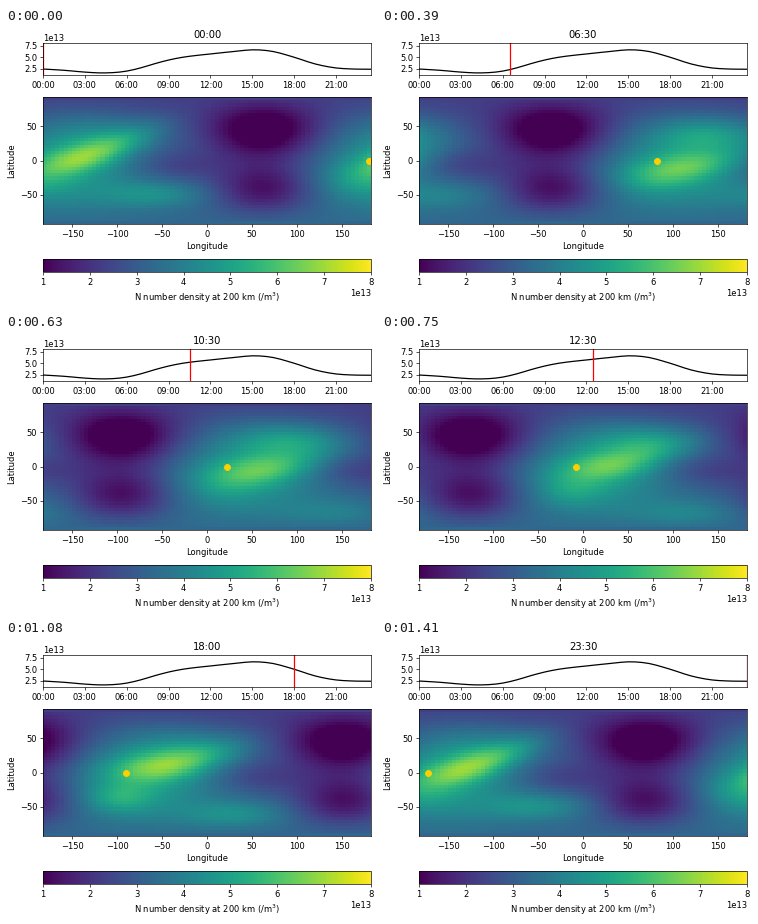
A matplotlib script for the animation above (1440 ms loop, 370x278 px).

```python
import matplotlib.pyplot as plt
import numpy as np
from matplotlib.animation import FuncAnimation

W, H, DPI = 370, 278, 60
FRAMES, INTERVAL = 48, 30
SCALE = 1e13

plt.rcParams["font.family"] = "DejaVu Sans"


def hermite(x, xs, ys):
    """Smooth curve through the points (xs, ys)."""
    xs, ys = np.asarray(xs, float), np.asarray(ys, float)
    slope = np.gradient(ys, xs)
    i = np.clip(np.searchsorted(xs, x, side="right") - 1, 0, len(xs) - 2)
    h = xs[i + 1] - xs[i]
    u = (x - xs[i]) / h
    return ((1 + 2 * u) * (1 - u) ** 2 * ys[i] + u * (1 - u) ** 2 * h * slope[i]
            + u * u * (3 - 2 * u) * ys[i + 1] + u * u * (u - 1) * h * slope[i + 1])


def daily(hour, values):
    """Value of a parameter that repeats every 24 hours."""
    v = list(values)
    return hermite(hour, [-6, *KEY_HOURS, 24, 28], [v[-1], *v, v[0], v[1]])


KEY_HOURS = [0, 4, 6.5, 10.5, 14.5, 18]
PARAMS = {
    "ridge_amp": [2.3, 1.7, 1.7, 1.7, 1.9, 2.3],
    "ridge_lon": [48, 28, 28, 38, 46, 49],
    "ridge_lat": [8, -10, -11, -5, 11, 12],
    "ridge_slope": [0.40, 0.25, 0.20, 0.20, 0.25, 0.20],
    "north_amp": [0, 0.5, 0.8, 0.9, 0.7, 0.2],
    "north_lon": [82, 25, 55, 75, 95, 100],
    "noon_amp": [0.6, 0.5, 0.4, 0.4, 1.3, 1.3],
    "dusk_amp": [1.3, 0.9, 0.8, 0.9, 1.3, 1.4],
    "dusk_lat": [-50, -48, -52, -68, -68, -62],
}

lon = np.linspace(-180, 180, 80)
lat = np.linspace(-90, 90, 40)
LON, LAT = np.meshgrid(lon, lat)
BASE = 2.8 - 0.5 * np.sin(np.radians(LAT))
TAPER = np.clip(np.cos(np.radians(LAT)), 0, 1) ** 0.25


def sun_lon(hour):
    return 180 - 15 * hour


def density(hour):
    p = {name: daily(hour, values) for name, values in PARAMS.items()}

    def bump(amp, lon0, lat0, sx, sy, slope=0, bend=0):
        dx = (LON - sun_lon(hour) - lon0 + 180) % 360 - 180
        dy = LAT - lat0 - slope * dx - bend * dx ** 2
        return amp * np.exp(-0.5 * ((dx / sx) ** 2 + (dy / sy) ** 2))

    field = (
        bump(1.9, 24, 0, 57, 50)
        + bump(0.85, 78, 43, 55, 22)
        + bump(p["ridge_amp"], p["ridge_lon"], p["ridge_lat"], 46, 16,
               p["ridge_slope"], 0.001)
        + bump(p["north_amp"], p["north_lon"], 38, 36, 15)
        + bump(p["noon_amp"], -8, -38, 26, 16)
        + bump(p["dusk_amp"], 121, p["dusk_lat"], 40, 14)
        + bump(-0.6, 147, -8, 35, 15)
        + bump(-2.4, -117, 46, 41, 29)
        + bump(-2.05, -117, -44, 38, 27)
    )
    return SCALE * (BASE + TAPER * field)


def add_axes(top, bottom):
    """Axes between two pixel rows, counted from the top of the stage."""
    return fig.add_axes([37 / W, 1 - bottom / H, 328 / W, (bottom - top) / H])


fig = plt.figure(figsize=(W / DPI, H / DPI), dpi=DPI, facecolor="white")
ax_time, ax_map, ax_bar = add_axes(15, 47), add_axes(69, 196), add_axes(231, 244)

# Daily curve
curve_hours = [0, 1.6, 3, 4.3, 6, 7, 8, 9, 10, 11, 12, 13.5, 15.3,
               16.3, 18, 19.5, 21, 22.2, 23.5]
curve_values = [2.45, 2.15, 1.78, 1.6, 2.0, 2.7, 3.6, 4.4, 5.0, 5.4, 5.72, 6.2, 6.62,
                6.35, 5.0, 3.55, 2.68, 2.45, 2.4]
hours = np.arange(FRAMES) / 2
ax_time.plot(hours, SCALE * hermite(hours, curve_hours, curve_values), color="black")
ax_time.set_xlim(0, 23.5)
ax_time.set_ylim(1.15 * SCALE, 8.1 * SCALE)
ax_time.set_yticks(SCALE * np.array([2.5, 5, 7.5]))
ticks = range(0, 24, 3)
ax_time.set_xticks(ticks, [f"{h:02d}:00" for h in ticks])
title = ax_time.set_title("00:00", y=1, pad=6)
cursor = ax_time.axvline(0, color="red")

# Density map
mesh = ax_map.pcolormesh(lon, lat, density(0), cmap="viridis", shading="nearest",
                         vmin=SCALE, vmax=8 * SCALE)
sun, = ax_map.plot([180], [0], "o", color="#ffd000", markersize=7.2)
half_x, half_y = 180 / 79, 90 / 39
ax_map.set_xlim(-180 - half_x, 180 + half_x)
ax_map.set_ylim(-90 - half_y, 90 + half_y)
ax_map.set_xticks(range(-150, 151, 50))
ax_map.set_yticks([-50, 0, 50])
ax_map.set_xlabel("Longitude")
ax_map.set_ylabel("Latitude")

bar = fig.colorbar(mesh, cax=ax_bar, orientation="horizontal",
                   ticks=SCALE * np.arange(1, 9))
bar.set_label("N number density at 200 km (/m$^3$)")


def update(i):
    hour = i / 2
    title.set_text(f"{i // 2:02d}:{i % 2 * 30:02d}")
    cursor.set_xdata([hour, hour])
    mesh.set_array(density(hour))
    sun.set_data([sun_lon(hour)], [0])
    return title, cursor, mesh, sun


anim = FuncAnimation(fig, update, frames=FRAMES, interval=INTERVAL,
                     repeat=True, repeat_delay=0, blit=False)
plt.show()
```
